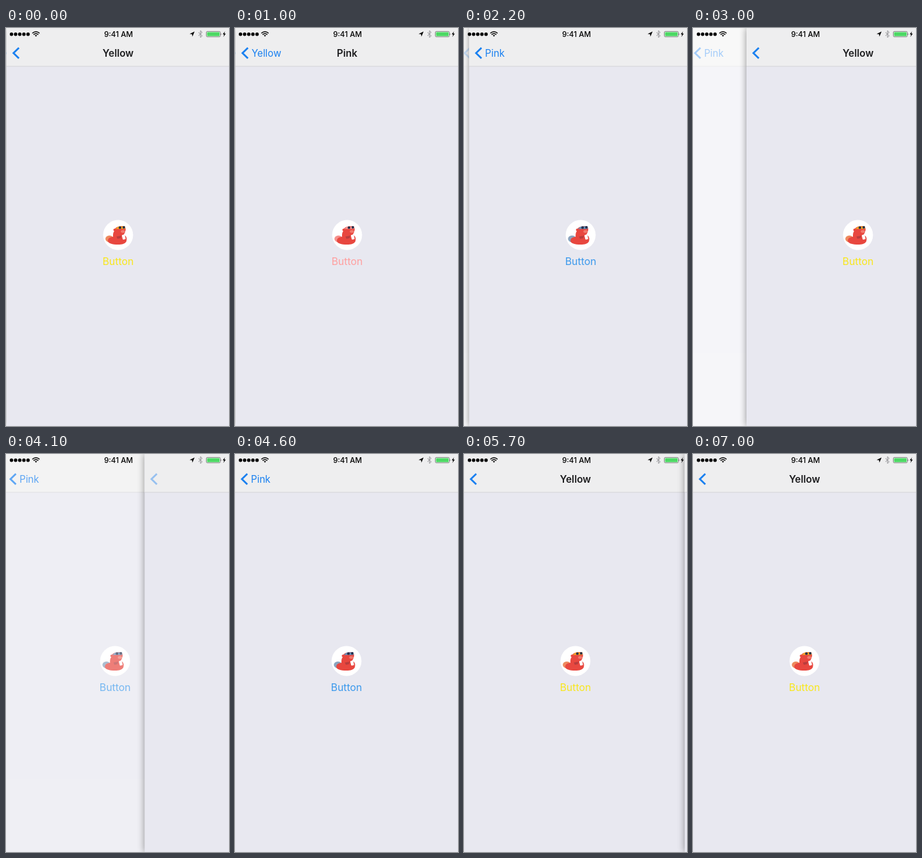
These frames come from a looping animation (350 by 623 pixels, 7.1 s). An HTML page:

```html
<!DOCTYPE html>
<html lang="en">
<head>
<meta charset="utf-8">
<title>Navigation stack</title>
<style>
  html, body { margin: 0; height: 100%; overflow: hidden; background: #fff; }
  svg { display: block; width: 100vw; height: 100vh; font-family: Inter, Roboto, sans-serif; }
  .title { font-size: 15.4px; font-weight: 600; fill: #1c1c1e; text-anchor: middle; }
  .back { fill: #1a80f0; font-size: 15.2px; }
  .back path { fill: none; stroke: #1a80f0; stroke-width: 2.8; }
  .label { font-size: 15.9px; text-anchor: middle; }
  .time { font-size: 11.7px; font-weight: 500; text-anchor: middle; }
  .shadow { filter: blur(6px); opacity: .42; }
</style>
</head>
<body>
<svg viewBox="0 0 350 623" preserveAspectRatio="none">
  <g id="panes"></g>
  <g id="status">
    <g id="signal"></g>
    <path d="M41.3 8.2Q47 3.4 52.7 8.2M43.3 10.4Q47 7.2 50.7 10.4" fill="none" stroke="#000" stroke-width="1.5"/>
    <path d="M45.1 11.6Q47 10.2 48.9 11.6L47 13.6Z"/>
    <text class="time" x="176.5" y="13.8">9:41 AM</text>
    <path d="M296 5.5L292.6 13.5L292 9.7L288.2 9.2Z"/>
    <path d="M302 6.8L308 12.2L305.2 15V4L308 6.8L302 12.2" fill="none" stroke="#929296"/>
    <rect x="314.4" y="5.4" width="22" height="8.4" rx="1.6" fill="#fff" stroke="#666" stroke-width=".8"/>
    <rect x="315.5" y="6.5" width="19.8" height="6.2" rx=".6" fill="#4cd964"/>
    <path d="M337 8.2Q338.6 9.6 337 11Z" fill="#333"/>
    <path d="M343.6 5.2L340.2 10H342.3L341.2 14L345 8.8H342.8Z"/>
  </g>
</svg>
<script>
const LOOP = 7100, WIDTH = 350, PARALLAX = 10;
const panes = document.getElementById('panes');

document.getElementById('signal').innerHTML =
  [0, 1, 2, 3, 4].map(i => `<circle cx="${8.6 + i * 6.5}" cy="9.8" r="2.7"/>`).join('');

const beaver = (tail, frame) => `
  <circle r="23.5" fill="#fff"/>
  <ellipse cx="-13.5" cy="6" rx="6.4" ry="5.2" fill="${tail}"/>
  <path d="M-16 9C-16 5 -12 3 -8 3C-8 -1 -8 -4 -6 -6C-8 -7 -8 -10 -5 -10C-2 -13 2 -14 6 -14
    C12 -14 13 -9 11 -5C11 -3 9 -2 9 0C14 2 14 6 13 10C11 14 6 15 0 15C-9 15 -16 13 -16 9Z" fill="#e8473f"/>
  <path d="M-2.5 2.5L5 1L4 5L-1 6Z" fill="#b93c3c"/>
  <ellipse cx="7.5" cy="-5.5" rx="3.2" ry="2.2" fill="#f27a6e"/>
  <path d="M-4.5 -9.5L1 -13.6H11V-9.5H0Z" fill="${frame}"/>
  <circle cx="3" cy="-11.5" r="2.1" fill="#26304a"/>
  <circle cx="9" cy="-12" r="2" fill="#26304a"/>
  <rect x="6.5" y="-.5" width="4.6" height="7.5" rx="1" fill="#fff" transform="rotate(-14 9 3)"/>`;

function makeScreen(title, back, tint, tail, frame) {
  const node = document.createElementNS('http://www.w3.org/2000/svg', 'g');
  node.innerHTML = `
    <rect class="shadow" width="350" height="623"/>
    <g class="content">
      <rect width="350" height="623" fill="#e8e8f0"/>
      <rect width="350" height="60" fill="#eeeeef"/>
      <rect y="59.5" width="350" height="1" fill="#d3d3d8"/>
      <g class="back"><path d="M19.3 31L10.8 39.3L19.3 47.6"/><text x="25" y="45.3">${back}</text></g>
      <text class="title" x="175" y="45.3">${title}</text>
      <g transform="translate(175 324)">${beaver(tail, frame)}</g>
      <text class="label" x="175" y="371.2" fill="${tint}">Button</text>
    </g>`;
  const find = name => node.querySelector('.' + name);
  return { node, content: find('content'), shadow: find('shadow'), back: find('back'), label: find('label') };
}

const yellow = makeScreen('Yellow', '', '#f8e71c', '#ee8a5e', '#f6ac24');
const pink = makeScreen('Pink', 'Yellow', '#ff9f9f', '#f6908c', '#f79a9a');
const blue = makeScreen('', 'Pink', '#3b99ec', '#8ba3bd', '#5f96c4');
const screens = [yellow, pink, blue];

const push = (at, under, over) => ({ at, under, over, pop: false, tapped: under.label });
const pop = (at, over, under) => ({ at, under, over, pop: true, tapped: over.back });
const moves = [
  push(-650, blue, yellow),
  push(350, yellow, pink),
  push(1787, pink, blue),
  push(2844, blue, yellow),
  pop(4033, yellow, blue),
  pop(4740, blue, pink),
  pop(5380, pink, yellow)
];

function place(screen, x, alpha, raised) {
  panes.append(screen.node);
  screen.node.setAttribute('transform', `translate(${x} 0)`);
  screen.node.style.display = '';
  screen.content.style.opacity = alpha;
  screen.shadow.style.display = raised ? '' : 'none';
}

function render(t) {
  for (const s of screens) {
    s.node.style.display = 'none';
    s.back.style.opacity = s.label.style.opacity = 1;
  }
  const { at, under, over, pop } = moves.findLast(m => m.at <= t);
  const cover = pop ? Math.exp((at - t) / 70) : 1 - Math.exp((at - t) / 110);
  const edge = WIDTH * (1 - cover);
  const gone = edge > WIDTH - 0.2;
  place(under, gone ? 0 : -PARALLAX * cover, gone ? 1 : 1 - 0.8 * cover, false);
  if (!gone) place(over, edge < 0.1 ? 0 : edge, 1, true);

  // A tapped control dims at once and recovers after release.
  for (const m of moves) {
    const since = t - m.at;
    if (since > -100 && since < 250) m.tapped.style.opacity = 0.2 + 0.8 * Math.max(0, since / 250);
  }
}

const start = performance.now();
function tick() {
  render((performance.now() - start) % LOOP);
  requestAnimationFrame(tick);
}
tick();
</script>
</body>
</html>
```
